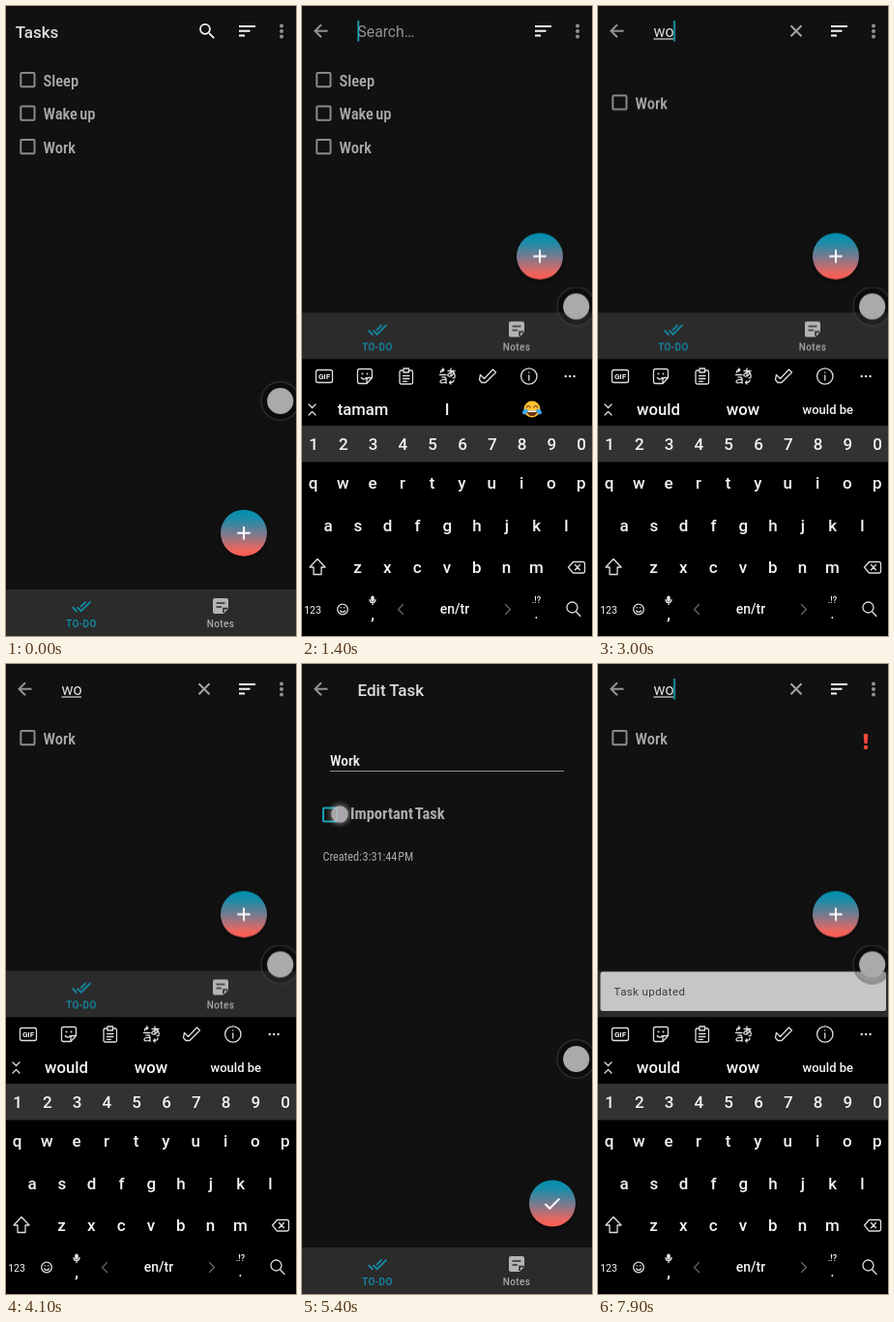
Animation of 300x650 px, one loop 8000 ms. Source, as an HTML page:

```html
<!DOCTYPE html>
<html lang="en">
<head>
<meta charset="utf-8">
<title>Tasks</title>
<style>
html, body { margin: 0; width: 100%; height: 100%; overflow: hidden; background: #111; }
svg { display: block; width: 300px; height: 650px; }
text { font-family: Roboto, 'Noto Sans', sans-serif; }
.line { fill: none; stroke-width: 2; }
.round { fill: none; stroke-linecap: round; stroke-linejoin: round; }
.title { font-size: 17px; font-weight: 500; fill: #dedede; }
.cond { font-family: 'Roboto Condensed', Roboto, sans-serif; font-stretch: 75%; font-size: 16.5px; font-weight: 500; word-spacing: -1.5px; fill: #acacac; }
.tab { font-size: 10px; font-weight: 500; letter-spacing: .4px; text-anchor: middle; }
.keys text { fill: #f4f4f4; text-anchor: middle; font-size: 17px; font-weight: 500; }
.keys .sug text { font-size: 16.7px; }

/* hard cuts */
.cut { animation: 8s step-end infinite; }
.k-home { animation-name: home; }
.k-search { animation-name: search; }
.k-hint { animation-name: hint; }
.k-w { animation-name: w; }
.k-wo { animation-name: wo; }
.k-typed { animation-name: typed; }
.k-under { animation-name: under; }
.k-s1 { animation-name: s1; }
.k-tick { animation-name: tick; }
.k-caret { animation-name: caret, blink; }
.k-dock { animation-name: dock; }
.k-touch { animation-name: touch; }
@keyframes home { 0% { opacity: 1 } 14.375%, 100% { opacity: 0 } }
@keyframes search { 0% { opacity: 0 } 14.375%, 100% { opacity: 1 } }
@keyframes hint { 0% { opacity: 0 } 14.375% { opacity: 1 } 25.625%, 100% { opacity: 0 } }
@keyframes w { 0% { opacity: 0 } 25.625% { opacity: 1 } 32.5%, 100% { opacity: 0 } }
@keyframes wo { 0% { opacity: 0 } 32.5%, 100% { opacity: 1 } }
@keyframes typed { 0% { opacity: 0 } 25.625%, 100% { opacity: 1 } }
@keyframes under { 0% { opacity: 0 } 32.5% { opacity: 1 } 56% { opacity: 0 } 87.5%, 100% { opacity: 1 } }
@keyframes s1 { 0% { opacity: 1 } 25.625%, 100% { opacity: 0 } }
@keyframes tick { 0% { opacity: 0 } 68.75%, 100% { opacity: 1 } }
@keyframes caret {
  0% { transform: none }
  25.625% { transform: translateX(12.5px) }
  32.5%, 100% { transform: translateX(20.7px) }
}
@keyframes blink {
  0% { opacity: 0 } 14.375% { opacity: 1 } 20% { opacity: 0 } 25.625% { opacity: 1 }
  38.75% { opacity: 0 } 45% { opacity: 1 } 51.2% { opacity: 0 } 80% { opacity: 1 }
  90% { opacity: 0 } 96.2%, 100% { opacity: 1 }
}
@keyframes dock {
  0% { transform: none } 16.5% { transform: translateY(-285.5px) }
  54.2% { transform: none } 87%, 100% { transform: translateY(-285.5px) }
}
@keyframes touch {
  0% { opacity: 0 }
  12.5% { opacity: 1; transform: translate(208px, 26px) } 14.375% { opacity: 0 }
  24.4% { opacity: 1; transform: translate(42px, 498px) } 26% { opacity: 0 }
  31.5% { opacity: 1; transform: translate(258px, 493px) } 33.4% { opacity: 0 }
  52.3% { opacity: 1; transform: translate(62px, 77px) } 54.2% { opacity: 0 }
  66.6% { opacity: 1; transform: translate(39px, 155px) } 68.75% { opacity: 0 }
  74.8% { opacity: 1; transform: translate(261px, 557px) } 77% { opacity: 0 }
  100% { opacity: 0 }
}

/* smooth moves */
.move { animation: 8s ease-in-out infinite; }
.m-list { animation-name: list; }
.m-edit { animation-name: edit; }
.m-sleep { animation-name: sleep; }
.m-wake { animation-name: wake; }
.m-work { animation-name: work; }
.m-flag { animation-name: flag; }
.m-keys { animation-name: keys; animation-timing-function: ease-out; }
.m-ball { animation-name: ball; }
.m-snack { animation-name: snack; animation-timing-function: ease-out; }
@keyframes list { 0%, 54.5% { opacity: 1 } 56%, 78.75% { opacity: 0 } 80.5%, 100% { opacity: 1 } }
@keyframes edit { 0%, 55% { opacity: 0 } 57%, 78% { opacity: 1 } 79.5%, 100% { opacity: 0 } }
@keyframes sleep { 0%, 26.25% { opacity: 1 } 27.75%, 100% { opacity: 0 } }
@keyframes wake {
  0%, 27.75% { transform: none; opacity: 1 }
  30.875%, 34.5% { transform: translateY(-34.5px); opacity: 1 }
  36%, 100% { transform: translateY(-34.5px); opacity: 0 }
}
@keyframes work {
  0%, 27.75% { transform: none }
  30.875%, 36.28% { transform: translateY(-34.5px) }
  39.4%, 100% { transform: translateY(-69px) }
}
@keyframes flag { 0%, 88% { opacity: 0 } 91%, 100% { opacity: 1 } }
@keyframes keys {
  0%, 14.375% { transform: translateY(286px) } 16.875%, 54.125% { transform: none }
  56.625%, 85% { transform: translateY(286px) } 87.5%, 100% { transform: none }
}
@keyframes ball {
  0%, 15.6% { transform: none } 17.2%, 54.2% { transform: translateY(-97.5px) }
  56.6%, 86% { transform: none } 87.6%, 100% { transform: translateY(-97.5px) }
}
@keyframes snack {
  0%, 87.5% { transform: translateY(50px); opacity: 0 }
  87.6% { transform: translateY(48px); opacity: 1 }
  90.6%, 100% { transform: none; opacity: 1 }
}
</style>
</head>
<body>
<svg viewBox="0 0 300 650">
  <defs>
    <linearGradient id="fab" x2="0" y2="1">
      <stop offset="0" stop-color="#008fae"/><stop offset=".2" stop-color="#1b8ca8"/>
      <stop offset=".55" stop-color="#85788a"/><stop offset=".85" stop-color="#e9665f"/>
      <stop offset="1" stop-color="#ff5c52"/>
    </linearGradient>
    <filter id="soft" x="-50%" y="-50%" width="200%" height="200%"><feGaussianBlur stdDeviation="2"/></filter>
    <path id="lens" d="M15.5 14h-.79l-.28-.27A6.47 6.47 0 0 0 16 9.5 6.5 6.5 0 1 0 9.5 16c1.61 0 3.09-.59 4.23-1.57l.27.28v.79l5 4.99L20.49 19zm-6 0a4.5 4.5 0 1 1 0-9 4.5 4.5 0 0 1 0 9z"/>
    <rect id="box" x="15.3" y="69" width="14.2" height="14.2" rx="1" class="line"/>
    <path id="back" d="M26.5 25.8H14M20 19.3l-6.5 6.5 6.5 6.5" class="line" stroke="#929292"/>
    <g id="disc">
      <circle cy="2.5" r="24" fill="#000" opacity=".45" filter="url(#soft)"/>
      <circle r="24" fill="url(#fab)"/>
    </g>
  </defs>
  <rect width="300" height="650" fill="#111"/>

  <g class="move m-list">
    <g class="cut k-home">
      <text class="title" x="9.8" y="33">Tasks</text>
      <use href="#lens" transform="translate(197.4 15.3) scale(.9)" fill="#f5f5f5"/>
    </g>
    <g class="cut k-search">
      <use href="#back"/>
      <text class="cut k-hint" x="57.5" y="32" font-size="15.7" fill="#929292">Search…</text>
      <g font-size="16" fill="#dcdcdc">
        <g class="cut k-w"><text x="57.5" y="32">w</text><path d="M58 34h12" stroke="#dcdcdc" stroke-width="1.2"/></g>
        <text class="cut k-wo" x="57.5" y="32">wo</text>
        <path class="cut k-under" d="M57.5 34h20.500" stroke="#dcdcdc" stroke-width="1.2"/>
      </g>
      <path class="cut k-typed line" d="M199.500 20.300l11 11m0-11l-11 11" stroke="#a2a2a2"/>
      <rect class="cut k-caret" x="57.4" y="15" width="1.8" height="21.5" fill="#1aa3b8"/>
    </g>
    <path class="line" d="M241 21h17M241 25.800h11.500M241 30.600h6" stroke="#f5f5f5"/>
    <g fill="#929292"><circle cx="285" cy="20.5" r="2"/><circle cx="285" cy="26" r="2"/><circle cx="285" cy="31.5" r="2"/></g>

    <g stroke="#8a8a8a">
      <g class="move m-sleep"><use href="#box"/><text class="cond" x="38.5" y="82.7" stroke="none">Sleep</text></g>
      <g class="move m-wake"><use href="#box" y="34.5"/><text class="cond" x="38.5" y="117.2" stroke="none">Wake up</text></g>
      <g class="move m-work"><use href="#box" y="69"/><text class="cond" x="38.5" y="151.7" stroke="none">Work</text></g>
    </g>
    <g class="move m-flag" fill="#f4483c">
      <path d="M274.7 73.5q0-1.7 2.3-1.7t2.3 1.7l-.8 8.8h-3z"/><circle cx="277" cy="86" r="2.2"/>
    </g>
  </g>

  <g class="move m-edit">
    <use href="#back"/>
    <text class="title" x="57.5" y="32.5">Edit Task</text>
    <text class="cond" x="29" y="105" style="font-size:15.3px;fill:#f2f2f2">Work</text>
    <path d="M29 110.5h242" stroke="#8d8d8d"/>
    <rect x="22" y="148.5" width="14" height="14" rx="1" class="line" stroke="#17a2b0"/>
    <g class="cut k-tick">
      <rect x="21" y="147.5" width="16" height="16" rx="1.5" fill="#17a2b0"/>
      <path class="line" d="M24.5 155.5l3.3 3.4 6-6.6" stroke="#111"/>
    </g>
    <text class="cond" x="50" y="160" style="font-weight:600">Important Task</text>
    <text class="cond" x="21.5" y="202.5" style="font-size:12.2px;font-weight:400;word-spacing:-2px">Created: 3:31:44 PM</text>
  </g>

  <g class="cut k-dock">
    <rect y="602" width="300" height="48" fill="#2b2b2b"/>
    <path transform="translate(67.7 609.2) scale(.86)" fill="#108fad" d="M18 7l-1.41-1.41-6.34 6.34 1.41 1.41zM22.24 5.59L11.66 16.17 7.48 12l-1.41 1.41L11.66 19l12-12zM.41 13.41L6 19l1.41-1.41L1.83 12z"/>
    <text class="tab" x="78" y="641.3" fill="#108fad">TO-DO</text>
    <path d="M216 611h12a2 2 0 0 1 2 2v9l-5 5h-9a2 2 0 0 1-2-2v-12a2 2 0 0 1 2-2z" fill="#b4b4b4"/>
    <path d="M217.5 616h9M217.5 620h5.5M225 626v-4.4h4.5" fill="none" stroke="#2b2b2b" stroke-width="1.6"/>
    <text class="tab" x="222" y="641.3" fill="#a9a9a9">Notes</text>
    <g class="move m-list">
      <use href="#disc" x="246" y="543.7"/>
      <path d="M239.3 543.7h13.4M246 537v13.4" class="line" stroke="#fff"/>
    </g>
  </g>
  <g class="move m-edit">
    <use href="#disc" x="259" y="556.5"/>
    <path d="M251.5 557l4.8 4.8 10-10.2" class="line" stroke="#fff"/>
  </g>

  <g class="move m-snack">
    <rect x="2.5" y="317.5" width="295.5" height="40.5" rx="2.5" fill="#c7c5c7"/>
    <text x="16.5" y="342" font-size="11.5" letter-spacing=".4" fill="#3c3c3c">Task updated</text>
  </g>

  <g class="move m-keys keys" id="keys">
    <rect y="364.5" width="300" height="286" fill="#000"/>
    <rect y="433" width="300" height="37.5" fill="#323232"/>
    <g class="round" stroke="#dedede" stroke-width="1.3">
      <rect x="14.5" y="375.5" width="17" height="13" rx="2"/>
      <path d="M59.5 374.5h11a2 2 0 0 1 2 2v7l-5.5 6h-7.5a2 2 0 0 1-2-2v-11a2 2 0 0 1 2-2zM72.5 383.5h-3.5a2 2 0 0 0-2 2v4M61.3 383.5q2.5 3.2 5.5 0"/>
      <path d="M105 376h-2.5a1.5 1.5 0 0 0-1.5 1.5v11a1.5 1.5 0 0 0 1.5 1.5h10.5a1.5 1.5 0 0 0 1.5-1.5v-11a1.5 1.5 0 0 0-1.5-1.5h-2.5M105 374h5.5v4h-5.5zM104.5 381.5h6.5M104.5 384.5h6.5M104.5 387.3h4"/>
      <path d="M142.5 380.5h6.5M145 383.2q4-1 4 1.8v4.5M149 385.5q-6-.5-6 2t6 .5M151 376.5h7M154 374v7.5M157 378q-2 5-5 4t1-3.5 5 2-2 3M143.5 378q0-2.5 3-2.5M145.5 374l1.5 1.5-1.5 1.5M157 386q0 2.5-4 2.5M154 387l-1.5 1.5 1.5 1.5"/>
      <path d="M184.5 380.5l4 4 9-9.5 3 3-10.5 10.5h-4l-2.5-3z"/>
      <circle cx="234.8" cy="382" r="8.2"/><path d="M234.8 381v5M234.8 378v.2"/>
      <path d="M7 411l3.5 3.5 3.5-3.5M7 422l3.5-3.5 3.5 3.5"/>
      <path d="M16 570.5l8 8.5h-4v7.5h-8v-7.5h-4z"/>
      <path d="M280.5 573.5h10a2 2 0 0 1 2 2v7.5a2 2 0 0 1-2 2h-10l-5-5.8zM282.5 576.5l5 5.3m0-5.3l-5 5.3"/>
      <circle cx="42" cy="622.5" r="5.3"/><path d="M39.5 624q2.5 2.6 5 0M40.3 620.7v.2M43.7 620.7v.2"/>
      <path d="M70 612.5q0 3 3 3t3-3M73 615.5v2"/>
      <circle cx="279.5" cy="620.5" r="5.5"/><path d="M283.5 624.8l4.5 4.7"/>
    </g>
    <path class="round" d="M104.5 617.5l-5 5 5 5M210.5 617.5l5 5-5 5" stroke="#666" stroke-width="1.4"/>
    <rect x="71.3" y="608.5" width="3.4" height="6" rx="1.7" fill="#eee"/>
    <g fill="#dedede">
      <circle cx="62.5" cy="379.5" r="1"/><circle cx="67.5" cy="379.5" r="1"/>
      <circle cx="272.8" cy="382" r="1.2"/><circle cx="277.2" cy="382" r="1.2"/><circle cx="281.6" cy="382" r="1.2"/>
    </g>
    <text x="23" y="385" style="font-size:8px;font-weight:700">GIF</text>
    <g class="sug">
      <g class="cut k-s1">
        <text x="63" y="422">tamam</text><text x="150" y="422">I</text>
        <circle cx="238" cy="416" r="8.5" fill="#fcc332"/>
        <path d="M232.5 417h11q-.5 6-5.5 6t-5.5-6z" fill="#6a3517"/><path d="M233.5 417.3h9v1.7h-9z" fill="#fff"/>
        <path class="round" d="M232.5 414q1.7-3 3.6 0M240 414q1.7-3 3.6 0" stroke="#6a3517" stroke-width="1.2"/>
        <ellipse cx="230.8" cy="418.5" rx="2.3" ry="3.2" fill="#43a8ee" transform="rotate(35 230.8 418.5)"/>
        <ellipse cx="245.2" cy="418.5" rx="2.3" ry="3.2" fill="#43a8ee" transform="rotate(-35 245.2 418.5)"/>
      </g>
      <g class="cut k-w"><text x="63" y="422">was</text><text x="150" y="422">we</text><text x="238" y="422">with</text></g>
      <g class="cut k-wo">
        <text x="62.5" y="422">would</text><text x="150" y="422">wow</text>
        <text x="237.8" y="421" style="font-size:13px">would be</text>
      </g>
    </g>
    <text x="11" y="627" style="font-size:10.5px;font-weight:400">123</text>
    <text x="73" y="633">,</text>
    <text x="158" y="627" style="font-size:14px">en/tr</text>
    <text x="242.5" y="616" style="font-size:9px">.!?</text>
    <text x="242.5" y="632" style="font-size:14px">.</text>
  </g>

  <g class="move m-ball">
    <circle cx="283.7" cy="407.5" r="19.7" fill="#000" fill-opacity=".25" stroke="#555" stroke-opacity=".4" stroke-width="1.5"/>
    <circle cx="283.7" cy="407.5" r="13.6" fill="#aba9ab"/>
  </g>
  <g class="cut k-touch">
    <circle r="11" fill="#fff" opacity=".3" filter="url(#soft)"/>
    <circle r="8.8" fill="#b8b6b8" fill-opacity=".85"/>
  </g>
</svg>
<script>
const keys = document.getElementById('keys');
const rows = [
  ['1234567890', 12, 458],
  ['qwertyuiop', 11.5, 498.2],
  ['asdfghjkl', 27, 541.5],
  ['zxcvbnm', 57.5, 584.7]
];
for (const [letters, x, y] of rows) {
  [...letters].forEach((letter, i) => {
    const key = document.createElementNS('http://www.w3.org/2000/svg', 'text');
    key.setAttribute('x', x + i * 30.8);
    key.setAttribute('y', y);
    key.textContent = letter;
    keys.append(key);
  });
}
</script>
</body>
</html>
```
